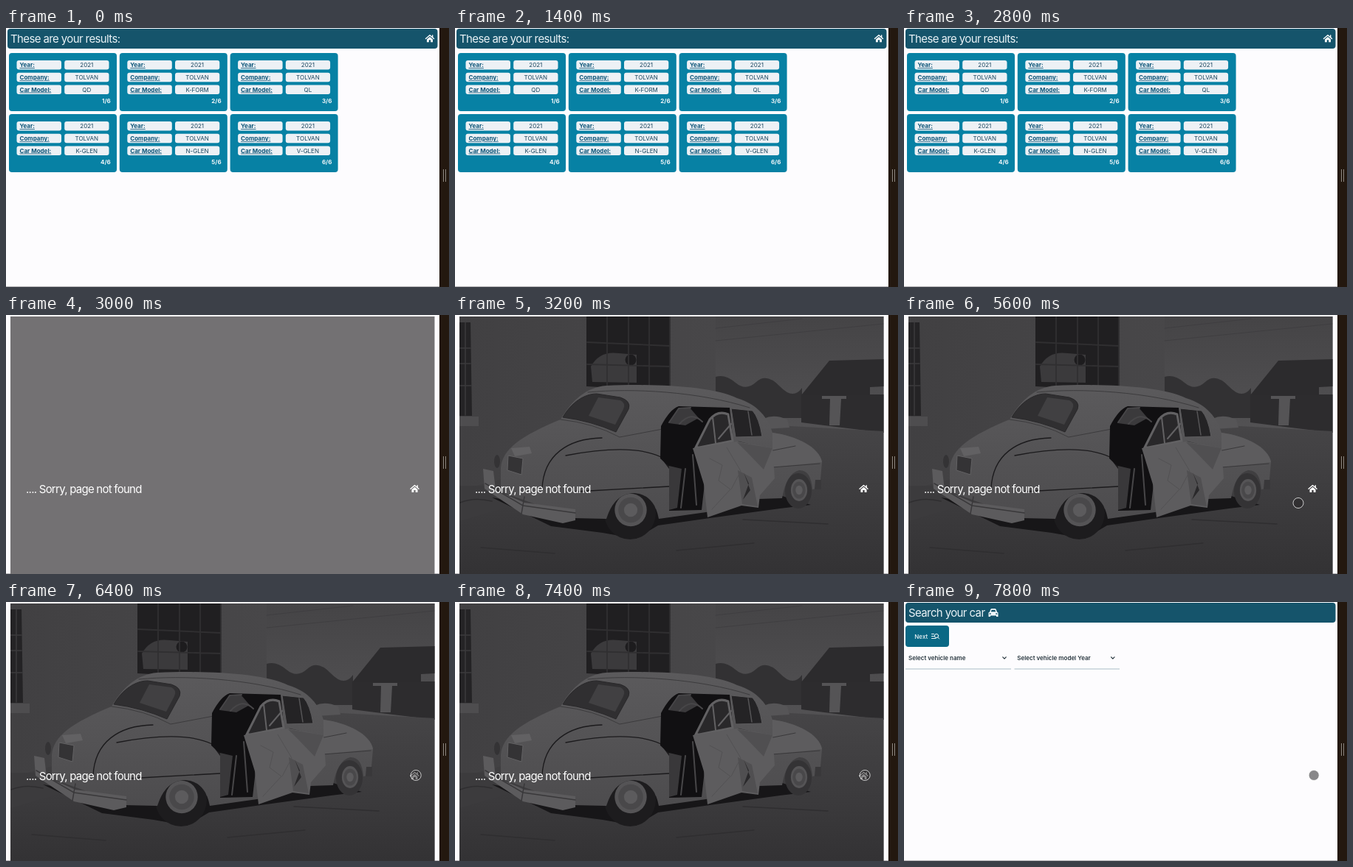
Recreate the animation shown at these times as an HTML page. Size 600 by 352 pixels, loop 8000 ms.

```html
<!DOCTYPE html>
<html lang="en">
<head>
<meta charset="utf-8">
<title>Car search</title>
<style>
  html, body { margin: 0; width: 100%; height: 100%; overflow: hidden; background: #fdfcfe; }
  svg { display: block; width: 600px; height: 352px; font: 500 8px Inter, "Open Sans", sans-serif; }
  .title { font-size: 15px; font-weight: 400; letter-spacing: -.041em; fill: #e9f2f6; }
  .label { font-weight: 700; text-decoration: underline; fill: #0b5478; }
  .value { font-weight: 400; text-anchor: middle; fill: #17435c; }
  .count { font-weight: 700; text-anchor: end; fill: #f1f7fa; }
  .line { fill: none; stroke-linecap: round; stroke-linejoin: round; }
</style>
</head>
<body>
<svg viewBox="0 0 600 352">
  <defs>
    <g id="home">
      <path class="line" d="M-5.5 .2L0-4.5 5.5 .2M3.7-4.3V-1.8" stroke="#fff" stroke-width="1.4"/>
      <path d="M-4 1.2L0-2.2 4 1.2V5H1.2V2H-1.2V5H-4Z" fill="#fff"/>
    </g>
    <g id="bar"><rect x="2" y="1" width="582.5" height="27" rx="4" fill="#15546b"/></g>
    <path id="chevron" class="line" d="M-2.2-1.2L0 1.2 2.2-1.2" stroke="#26343d" stroke-width="1.2"/>
    <linearGradient id="wall" x2="1" y2="0"><stop stop-color="#414042"/><stop offset="1" stop-color="#484749"/></linearGradient>
    <linearGradient id="sky" x2="0" y2="1"><stop stop-color="#454446"/><stop offset="1" stop-color="#535254"/></linearGradient>
    <linearGradient id="ground" x2="0" y2="1"><stop stop-color="#464547"/><stop offset=".6" stop-color="#3b3a3c"/><stop offset="1" stop-color="#333234"/></linearGradient>
    <linearGradient id="paint" x2="0" y2="1"><stop stop-color="#5b5a5c"/><stop offset="1" stop-color="#4d4c4e"/></linearGradient>
    <clipPath id="frame"><rect x="6" y="2" width="574.5" height="350"/></clipPath>
  </defs>

  <path d="M0 351.5H587" stroke="#b5b3b6"/>

  <g id="results">
    <use href="#bar"/>
    <text class="title" x="6" y="19.8">These are your results:</text>
    <use href="#home" x="574" y="14.3"/>
  </g>

  <g id="missing">
    <rect x="6" y="2" width="574.5" height="350" fill="#737173"/>
    <g id="photo" clip-path="url(#frame)">
      <!-- yard -->
      <path d="M6 2H354V245H6Z" fill="url(#wall)"/>
      <path d="M353 2H581V160H353Z" fill="url(#sky)"/>
      <path class="line" d="M353 18L470 5M353 35L580 12" stroke="#3d3c3e" stroke-width=".7"/>
      <path d="M353 84Q366 80 380 92T408 91T440 97T470 99V140H353Z" fill="#323133"/>
      <path d="M469 108H581V160L469 146Z" fill="#2d2c2e"/>
      <path d="M469 109L507 62 581 60V97L562 98V109Z" fill="#2c2b2d"/>
      <path d="M497 110H530V114H497ZM508 114H523L521 150H507Z" fill="#555456"/>
      <path d="M6 238L150 200 400 148 581 158V352H6Z" fill="url(#ground)"/>
      <path d="M6 232H70V262L6 280Z" fill="#3c3b3d"/>
      <!-- windows -->
      <path d="M178 2H291V103L178 97Z" fill="#201f21"/>
      <path d="M184 70Q196 48 222 52L246 54V92L186 91Z" fill="#3b3a3c"/>
      <circle cx="238" cy="61" r="7.5" fill="#1d1c1e"/>
      <path class="line" d="M206 2V96M235 2V98M263 2V99M179 37L291 42M179 67L291 70M291 2V103" stroke="#302f31" stroke-width="1.8"/>
      <path d="M6 10H21L23 137H6Z" fill="#242325"/>
      <path class="line" d="M6 45H21M6 66H21M6 96H22M14 10V136" stroke="#3b3a3c" stroke-width="1.5"/>
      <path d="M6 138H32V151H6Z" fill="#4e4d4f"/>
      <!-- shadow and wheels, tucked under the car body -->
      <path d="M50 248L180 270 290 262 440 245 482 258 440 263 345 276 275 286 245 304 200 296 130 287Z" fill="#171618"/>
      <g id="wheels"></g>
      <path d="M418 141Q432 134 450 142L453 153 420 155Z" fill="#565557"/>
      <path d="M62 208C64 182 90 164 143 142 158 116 178 98 205 96 270 93 350 97 382 113 411 122 424 140 430 160 462 164 494 180 497 200L494 235 484 237Q482 210 466 211 449 215 443 249L411 250 340 268 276 277Q270 244 243 242 216 242 205 277L160 276 62 240Z" fill="url(#paint)"/>
      <path class="line" d="M143 142Q188 147 223 166L281 155M180 105C240 99 330 104 399 126" stroke="#3c3b3d" stroke-width="1"/>
      <path d="M146 139C158 118 176 107 192 107L224 112Q239 117 235 128L218 159Q184 144 146 139Z" fill="#302f31" stroke="#29282a"/>
      <path d="M194 112L224 116Q232 120 228 128L217 149 181 137Z" fill="#414042"/>
      <path class="line" d="M118 236C120 190 153 168 199 167M150 191Q240 174 279 193L290 208M163 240L290 233" stroke="#1b1a1c" stroke-width="1.3"/>
      <path d="M430 160C462 164 494 180 497 200L430 207Z" fill="#5d5c5e"/>
      <path class="line" d="M384 172L431 184 461 178M430 207L494 202" stroke="#39383a" stroke-width="1"/>
      <!-- cabin and door -->
      <path d="M279 151Q291 128 303 124L372 126 376 165 324 181 338 230 334 265 290 266 293 209 278 195Z" fill="#111012"/>
      <path d="M290 147L303 128 318 126 330 140 312 150Z" fill="#3b3a3c"/>
      <path d="M290 205L307 209 301 262 290 265Z" fill="#39383a"/>
      <path class="line" d="M290 146L303 127 319 126M304 148Q320 130 335 145M312 209L306 262M322 190L327 258" stroke="#474648" stroke-width="2"/>
      <path d="M374 127L403 130Q412 140 416 165L380 166Z" fill="#242325" stroke="#5d5c5e"/>
      <path class="line" d="M397 131L402 163" stroke="#565557" stroke-width="1.5"/>
      <path d="M326 180L345 142Q356 129 370 135L376 171 331 180Z" fill="#29282a" stroke="#626163" stroke-width="3"/>
      <path class="line" d="M349 139L353 174M357 168L374 148" stroke="#626163" stroke-width="2"/>
      <path d="M322 181L382 172 430 181 433 222 413 245 411 262 388 259 342 275 337 230Z" fill="#5d5c5e"/>
      <path d="M382 173L430 181 418 210 396 187ZM383 211L402 221 410 260 389 257Z" fill="#504f51"/>
      <path d="M391 214L398 229 390 251 400 238Z" fill="#2a292b"/>
      <path class="line" d="M345 195L362 204 357 225 373 237 348 264M368 180L387 212 374 237" stroke="#525153"/>
      <!-- rear end -->
      <path d="M38 209L52 212 55 238 94 255 163 264V279L146 283 92 271 40 236Z" fill="#5c5b5d"/>
      <path class="line" d="M41 229L92 259 163 269M94 247L90 270" stroke="#39383a" stroke-width="1.5"/>
      <path d="M72 191L92 195 90 217 71 211Z" fill="#343335" stroke="#636264"/>
      <path d="M76 181L101 179 104 188 81 192Z" fill="#626163"/>
      <ellipse cx="57" cy="199" rx="4" ry="9" fill="#343335"/>
      <path d="M488 224H496V237H487Z" fill="#39383a"/>
      <path class="line" d="M7 255Q26 247 50 253M300 320L405 310M390 278L505 284M35 316L135 324" stroke="#2f2e30" stroke-width="1.5"/>
    </g>
    <text class="title" x="27" y="241.5" style="fill:#fff;letter-spacing:-.05em">.... Sorry, page not found</text>
    <use href="#home" x="553.5" y="236"/>
  </g>

  <g id="search">
    <use href="#bar"/>
    <text class="title" x="6" y="19.8">Search your car</text>
    <path d="M114.5 20V14.5L116 13.5 117.3 10Q117.8 9 119 9H123Q124.2 9 124.7 10L126 13.5 127.5 14.5V20H125V18.5H117V20ZM117.8 13.2H124.2L123.3 10.8H118.7Z" fill="#f1f7fa" fill-rule="evenodd"/>
    <path d="M115.7 15.2H117.7V16.7H115.7ZM124.3 15.2H126.3V16.7H124.3Z" fill="#15546b"/>
    <rect x="2" y="32" width="59" height="29" rx="4" fill="#0a6885"/>
    <text x="14.3" y="49.5" fill="#f1f7fa">Next</text>
    <g class="line" stroke="#f1f7fa" stroke-width="1"><path d="M37.5 43.5H40.5M37.5 46.5H40.5M37.5 49.5H43M45.8 48L47.7 50"/><circle cx="44" cy="46" r="2.6"/></g>
    <g fill="#26343d" font-weight="600"><text x="6" y="78.8">Select vehicle name</text><text x="153.3" y="78.8">Select vehicle model Year</text></g>
    <use href="#chevron" x="136" y="76"/><use href="#chevron" x="282.8" y="76"/>
    <path d="M2 91H145M149.5 91H292" stroke="#d3dde2" stroke-width="2"/>
  </g>

  <path d="M587 0H600V352H587Z" fill="#23180f"/>
  <path d="M592.5 192V209M595.5 192V209" stroke="#8d8781"/>
  <circle id="cursor" r="7" fill="#282628" fill-opacity=".55" stroke="#fff" stroke-opacity=".75"/>
</svg>
<script>
const $ = id => document.getElementById(id);
const box = (x, y, w, h, fill, r) => `<rect x="${x}" y="${y}" width="${w}" height="${h}" rx="${r}" fill="${fill}"/>`;

function card(model, i) {
  const rows = [["Year:", "2021"], ["Company:", "TOLVAN"], ["Car Model:", model]];
  const fields = rows.map(([label, value], r) => {
    const y = 10 + r * 16.7;
    return box(10.5, y, 60.5, 12.6, "#edf1f5", 3) + box(75.2, y, 60.3, 12.6, "#edf1f5", 3) +
      `<text class="label" x="14.5" y="${y + 9.2}">${label}</text>` +
      `<text class="value" x="105.3" y="${y + 9.2}">${value}</text>`;
  }).join("");
  return `<g transform="translate(${4 + i % 3 * 149.8} ${34 + (i > 2) * 83})">` +
    box(0, 0, 146, 79, "#0781a4", 4) + fields +
    `<text class="count" x="137.8" y="67.5">${i + 1}/6</text></g>`;
}

const disc = (x, y, rx, ry, fill) => `<ellipse cx="${x}" cy="${y}" rx="${rx}" ry="${ry}" fill="${fill}"/>`;
const wheel = (x, y, rx, ry, drop, tyre) => disc(x, y + drop, rx, ry, tyre) +
  [[.62, "#555456"], [.48, "#49484a"], [.26, "#5c5b5d"]]
    .map(([k, fill]) => disc(x + 1, y, rx * k, ry * k, fill)).join("");

$("results").insertAdjacentHTML("beforeend",
  ["QD", "K-FORM", "QL", "K-GLEN", "N-GLEN", "V-GLEN"].map(card).join(""));
$("wheels").innerHTML = wheel(237, 265, 35, 36, 4, "#1d1c1e") + wheel(465, 238, 18, 24, 1, "#343335");

const show = (id, on) => $(id).style.display = on ? "" : "none";
const start = performance.now();

function draw(now) {
  const t = Math.max(0, now - start) % 8000;
  show("results", t < 3000);
  show("missing", t >= 3000 && t < 7800);
  show("photo", t >= 3200);
  show("search", t >= 7800);
  show("cursor", t >= 5600);
  // The pointer advances in 200 ms ticks and settles on the home icon.
  const p = Math.min(1, Math.max(0, Math.floor((t - 5600) / 200) / 4));
  const ease = p * (2 - p);
  $("cursor").setAttribute("transform", `translate(${534 + 21.2 * ease} ${255.5 - 20 * ease})`);
  requestAnimationFrame(draw);
}
draw(start);
</script>
</body>
</html>
```
